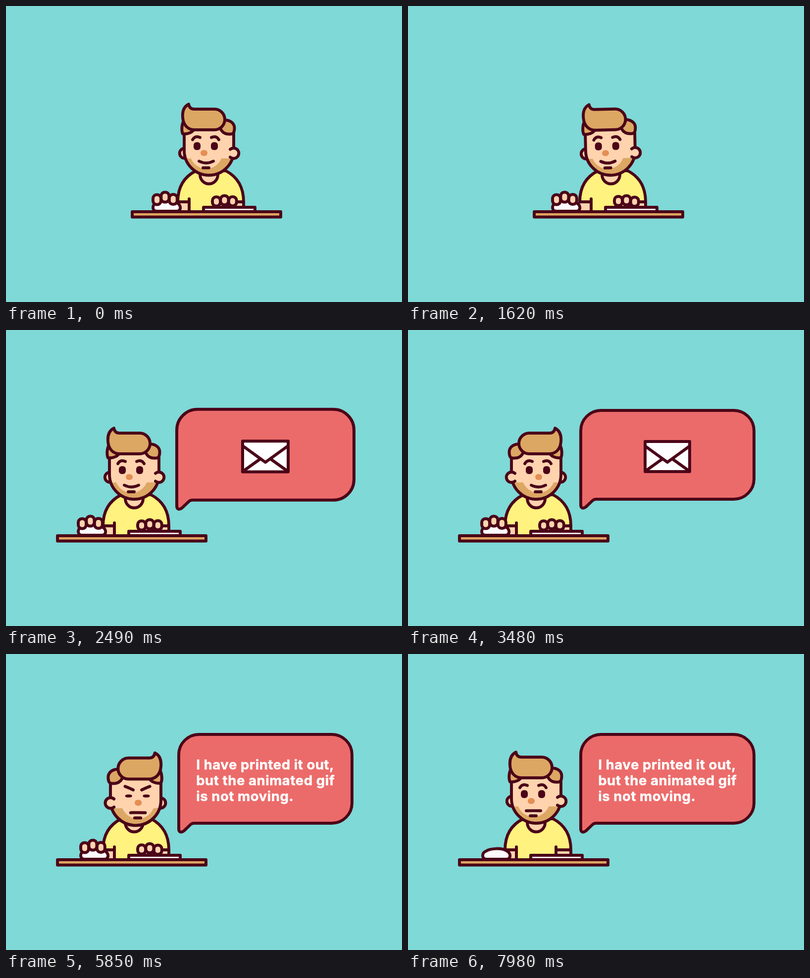
These frames come from a looping animation (800 by 600 pixels, 8000 ms). An HTML page:

```html
<!DOCTYPE html>
<html lang="en">
<head>
<meta charset="utf-8">
<title>Message at the desk</title>
<style>
  html, body { margin: 0; width: 100%; height: 100%; overflow: hidden; background: #7ed9d7; }
  svg { display: block; width: 100vw; height: 100vh; }
  .line { stroke: #4b0418; stroke-width: 5.9; stroke-linecap: round; stroke-linejoin: round; }
  .skin { fill: #ffd3ae; }
  .hair { fill: #dca763; }
  .shirt { fill: #fff27e; }
  .white { fill: #fdfbfe; }
  .dark { fill: #4b0418; }
  .none { fill: none; }
  text {
    font: 700 27.5px Inter, "Open Sans", sans-serif; letter-spacing: .57px;
    fill: #fff; stroke: #fff; stroke-width: .5; stroke-linejoin: round;
  }
</style>
</head>
<body>
<svg viewBox="0 0 800 600">
  <defs>
    <clipPath id="faceClip"><path d="M360 247V293a50 50 0 0 0 100 0V247Z"/></clipPath>
    <clipPath id="deskClip"><path d="M0 0H800V417H0Z"/></clipPath>
  </defs>

  <g id="person">
    <!-- torso and forearms -->
    <path class="skin" d="M349 395H370V417H349Z"/>
    <path class="shirt" d="M347 397C347 365 362 345 384 334H444C465 345 480 365 480 397L450 398V417H370V397Z"/>
    <path class="skin" d="M450 397H480V417H450Z"/>
    <path class="line none" d="M370 397H347C347 365 362 345 384 334H444C465 345 480 365 480 397V415M450 397H480M370 391V415M450 391V415"/>
    <path class="line skin" d="M392 338V342a18 18.5 0 0 0 36 0V338"/>

    <g id="head">
      <g class="ears"><circle class="line skin" cx="361" cy="298.5" r="10.2"/></g>
      <g clip-path="url(#faceClip)">
        <path class="skin" d="M360 247H460V309H360Z"/>
        <path class="hair" d="M360 309H460V345H360Z"/>
        <circle class="skin feature" cx="404.5" cy="297" r="33"/>
      </g>
      <path class="line none" d="M360 250V293a50 50 0 0 0 100 0V250"/>
      <g class="ears">
        <path class="skin" d="M453 290.5A10.5 10.5 0 1 1 453 306.5Z"/>
        <path class="line none" d="M453 290.5A10.5 10.5 0 1 1 453 306.5"/>
      </g>
      <g class="hairdo">
        <path class="line hair" d="M440 231C456 231 461.5 240 461.5 247C461.5 254 460 259.5 455 259.5C446 260.5 438 258 434 250"/>
        <path class="line hair" d="M360 232C355 238 354 252 357 259C366 260 376 257 380 250"/>
        <path class="line hair" d="M369 199C359 204 356 214 357 226C358 242 368 251 381 251H421A21 21 0 0 0 421 209H380C373 209 370 205 369 199Z"/>
      </g>
      <g class="feature">
        <path id="brows" class="line none"/>
        <rect class="eye dark" x="379" width="14" rx="5.8"/>
        <rect class="eye dark" x="414" width="14" rx="5.8"/>
        <rect id="nose" x="393" y="292" width="14" height="12" rx="6" fill="#e48f54"/>
        <path id="mouth" class="line none"/>
        <path class="line none" d="M398 328H410"/>
      </g>
    </g>

    <rect class="line" x="255" y="417" width="300" height="10.8" fill="#dfa55f"/>
    <rect class="line white" x="399" y="408" width="104" height="8.8"/>
    <g id="mouse">
      <path class="line white" d="M303 416C294 414 296 402 303 400C311 394 336 392 345 399C352 402 356 412 347 416Z"/>
      <g clip-path="url(#deskClip)"><g id="mouseHand"></g></g>
    </g>
    <g clip-path="url(#deskClip)"><g id="keyHand"></g></g>
  </g>

  <g id="bubble">
    <path class="line" fill="#eb6b6a" d="M390 163H658A41 41 0 0 1 699 204V302A41 41 0 0 1 658 343H380Q375.500 343 372.500 346L359.500 358.500Q354.500 362.500 351 360Q349 358.500 349 355V204A41 41 0 0 1 390 163Z"/>
    <g id="envelope">
      <rect class="line" fill="#fff" x="479" y="226" width="90" height="61"/>
      <path class="line none" d="M480 236L524 268L568 236M481 285L513 262M567 285L535 262"/>
    </g>
    <g id="message">
      <text x="384.2" y="234">I have printed it out,</text>
      <text x="384.2" y="266">but the animated gif</text>
      <text x="384.2" y="298">is not moving.</text>
    </g>
  </g>
</svg>

<script>
const byId = id => document.getElementById(id);
const all = selector => document.querySelectorAll(selector);
const place = (el, transform) => el.setAttribute("transform", transform);
const mix = (a, b, k) => a + (b - a) * k;

function ease(t, start, end) {
  const k = Math.min(1, Math.max(0, (t - start) / (end - start)));
  return k * k * (3 - 2 * k);
}

// Eased value from a list of [time, value] keys.
function track(t, keys) {
  let value = keys[0][1];
  for (let i = 1; i < keys.length; i++)
    value += (keys[i][1] - keys[i - 1][1]) * ease(t, keys[i - 1][0], keys[i][0]);
  return value;
}

const scaleAt = (x, y, s) => `translate(${x} ${y}) scale(${s}) translate(${-x} ${-y})`;
const mirrorAt = x => `translate(${2 * x} 0) scale(-1 1)`;

// Three capsule fingers, the middle one in front.
function addFingers(hand, x, tops, height) {
  return [0, 2, 1].map(i => {
    const finger = document.createElementNS("http://www.w3.org/2000/svg", "rect");
    const box = { x: x + 16.4 * i - 8, y: tops[i], width: 16, height, rx: 7.5, class: "line skin" };
    for (const key in box) finger.setAttribute(key, box[key]);
    hand.append(finger);
    return finger;
  });
}
addFingers(byId("mouseHand"), 305, [382.5, 377.5, 382], 20);
const typing = addFingers(byId("keyHand"), 425, [387, 384.5, 387.5], 18.5);

function drawFace(anger, flat) {
  const y = (calm, angry) => mix(calm, angry, anger);
  const brow = flip => {
    const x = (calm, angry) => flip ? 807 - y(calm, angry) : y(calm, angry);
    return `M${x(377, 379)} ${y(271, 265.5)}Q${x(382, 387)} ${y(262, 268.5)} ${x(392, 395)} ${y(266.5, 272.5)}`;
  };
  byId("brows").setAttribute("d", brow(false) + brow(true));
  for (const eye of all(".eye")) {
    eye.setAttribute("y", y(276, 281.5));
    eye.setAttribute("height", y(16, 6));
  }
  const corner = mix(314.5, 317.7, flat);
  byId("mouth").setAttribute("d", `M390 ${corner}Q404.5 ${mix(322, 317.5, flat)} 419 ${corner}`);
}

function render(t) {
  place(byId("person"), `translate(${-151 * ease(t, 1660, 2220)} 0)`);

  const turn = ease(t, 2700, 2950) - ease(t, 6750, 7050);
  const anger = ease(t, 4950, 5400) - ease(t, 6690, 6950);
  const sway = t < 2490 ? -0.85 * (1 - Math.cos(2 * Math.PI * t / 2490)) : 0;
  place(byId("head"), `translate(${3 * anger} ${3 * anger}) ${scaleAt(410, 271, 1 + 0.02 * anger)} rotate(${sway} 410 340)`);
  const facingRight = turn > 0.5;
  for (const part of all(".ears")) place(part, facingRight ? mirrorAt(410) : "");
  for (const part of all(".hairdo")) place(part, facingRight ? mirrorAt(408.5) : "");
  for (const part of all(".feature")) place(part, `translate(${10 * turn} 0)`);
  place(byId("nose"), `translate(${5 * turn} 0)`);
  drawFace(anger, ease(t, 4950, 5400));

  const mouseX = track(t, [[0, 0], [760, 4], [1590, -5], [2490, 0], [3480, 3], [4380, 5]]);
  place(byId("mouse"), `translate(${mouseX} 0)`);
  const drop = `translate(0 ${45 * ease(t, 7150, 7470)})`;
  place(byId("mouseHand"), drop);
  place(byId("keyHand"), drop);
  typing.forEach((finger, i) => {
    const tap = t < 4380 ? Math.max(0, Math.sin(t / 80 + 2.1 * i)) : 0;
    place(finger, `translate(0 ${-tap})`);
  });

  const grow = track(t, [[2120, 0], [2370, 1.066], [2570, 1]]);
  place(byId("bubble"), scaleAt(524, 262, grow));
  place(byId("envelope"), scaleAt(524, 256.5, 1 - ease(t, 3560, 3760)));
  byId("message").setAttribute("opacity", ease(t, 3760, 3940));
}

function frame() {
  render(performance.now() % 8000);
  requestAnimationFrame(frame);
}
frame();
</script>
</body>
</html>
```
